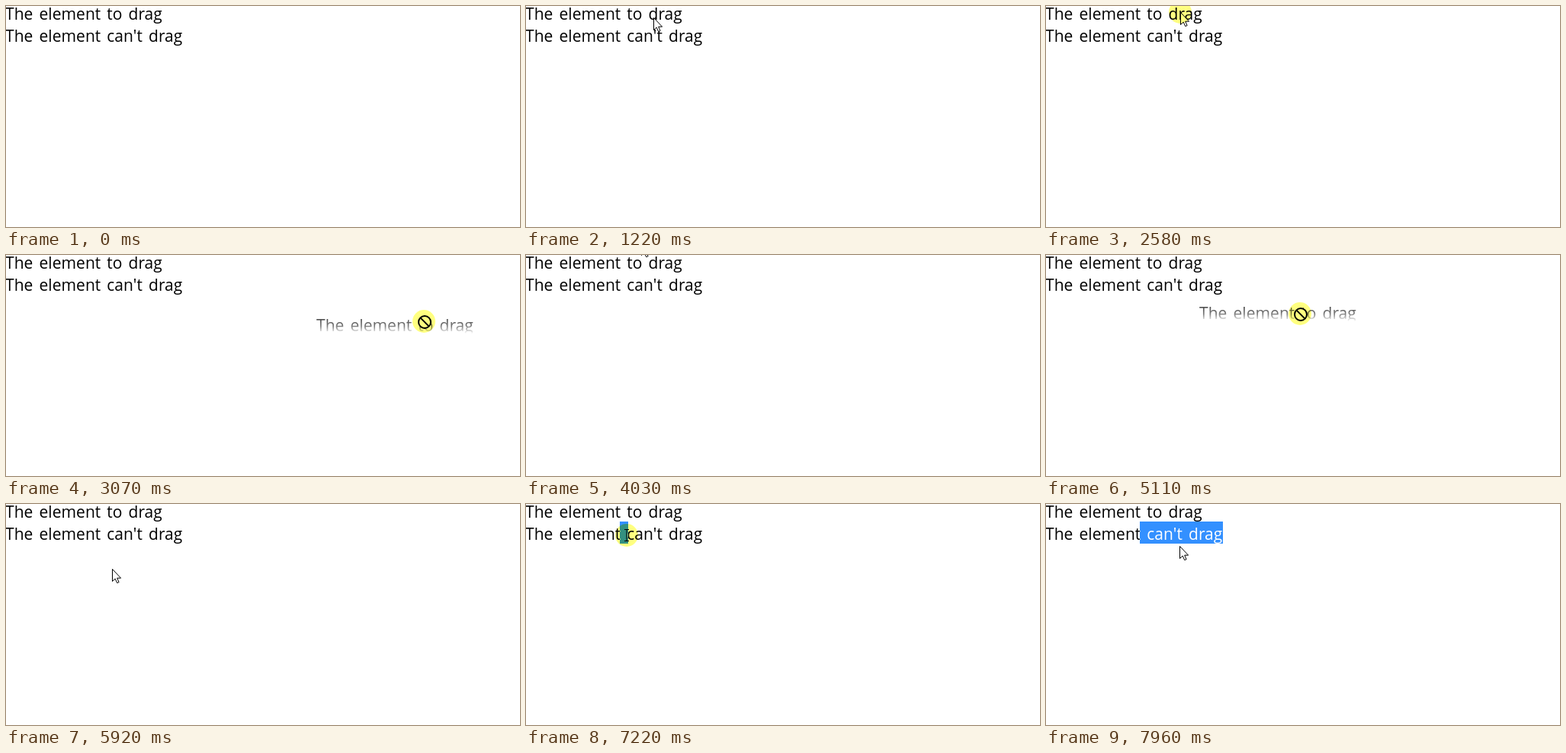
An HTML page that plays this animation: 674 px wide and 290 px high, repeating every 8000 ms.

```html
<!DOCTYPE html>
<html lang="en">
<head>
<meta charset="utf-8">
<title>Drag demo</title>
<style>
  html, body { margin: 0; width: 100%; height: 100%; overflow: hidden; background: #fff; }
  svg { display: block; }
  text { font: 21px "Open Sans", "Noto Sans", sans-serif; letter-spacing: .05px; word-spacing: 2.5px; white-space: pre; }
  #press { mix-blend-mode: multiply; }
</style>
</head>
<body>
<svg width="674" height="290" viewBox="0 0 674 290">
  <defs>
    <linearGradient id="fade" gradientUnits="userSpaceOnUse" x1="0" y1="-16" x2="0" y2="3">
      <stop offset="0" stop-opacity=".7"/>
      <stop offset=".5" stop-opacity=".5"/>
      <stop offset="1" stop-opacity="0"/>
    </linearGradient>
    <clipPath id="selected"><rect id="clip" x="123" y="23" width="0" height="29"/></clipPath>
  </defs>

  <text x="-1" y="18">The element to drag</text>
  <text x="-1" y="47">The element can't drag</text>
  <g clip-path="url(#selected)">
    <rect x="123" y="23" width="109" height="29" fill="#3390ff"/>
    <text x="-1" y="47" fill="#fff">The element can't drag</text>
  </g>

  <text id="ghost" fill="url(#fade)">The element to drag</text>

  <path id="arrow" d="M.5 .5V16.5L4.2 13.1 6.7 18.6 9.1 17.6 6.7 12.2H11.6Z" fill="#fff" stroke="#000"/>
  <path id="beam" d="M-3 -7.5H3M-3 7.5H3M0 -7V7" fill="none" stroke="#000"/>
  <g id="deny" fill="#fff" stroke="#000" stroke-width="2">
    <circle cx="1" cy="1" r="8"/>
    <path d="M-4.6 -4.6L6.6 6.6"/>
  </g>
  <circle id="press" r="15" fill="#ffff80"/>
</svg>
<script>
const LOOP = 8000;
const SEL_LEFT = 123, SEL_RIGHT = 232, CHAR = 11;
const $ = id => document.getElementById(id);

const linear = k => k;
const easeOut = k => 1 - (1 - k) ** 1.75;
const easeInOut = k => k * k * (3 - 2 * k);

// Pointer strokes: n held positions from time a to b along a quadratic curve.
const strokes = [];
function stroke(a, b, n, from, to, ease = linear, bend) {
  const mid = bend || from.map((v, i) => (v + to[i]) / 2);
  const at = t => {
    const k = Math.min(1, Math.floor((t - a) / (b - a) * (n - 1) + 1e-6) / (n - 1));
    const u = ease(k), v = 1 - u;
    return from.map((p, i) => Math.round(v * v * p + 2 * u * v * mid[i] + u * u * to[i]));
  };
  strokes.push({ a, at });
}
const hide = a => strokes.push({ a, at: () => [-60, -60] });

hide(0);
stroke(70, 820, 10, [589, 274], [165, 20], easeOut, [259, 131]);
stroke(890, 2100, 6, [166, 17], [169, 7]);
stroke(2580, 3210, 10, [176, 8], [573, 96], easeOut, [400, 30]);
stroke(3410, 3630, 4, [572, 96], [244, -12]);
hide(3700);
stroke(4030, 4430, 5, [151, -16], [151, 9]);
stroke(4830, 5380, 9, [172, 12], [525, 252], easeInOut, [318, 22]);
stroke(5710, 5920, 4, [518, 245], [139, 85]);
stroke(6050, 6670, 9, [135, 78], [124, 36]);
stroke(7020, 7660, 9, [122, 38], [249, 93], easeInOut, [150, 45]);
stroke(7750, 7960, 4, [228, 82], [175, 55]);

const drags = [
  { down: 2300, from: 2650, up: 3410, dx: -141, dy: 13 },
  { down: 4630, from: 4830, up: 5710, dx: -132, dy: 7 }
];
const select = { down: 7020, up: 7730 };

const pointer = t => strokes.findLast(s => s.a <= t).at(t);
const show = (id, on) => $(id).setAttribute("visibility", on ? "visible" : "hidden");
const place = (id, x, y) => $(id).setAttribute("transform", `translate(${x} ${y})`);

// Below the line everything is selected; on it, up to the nearest character.
function selectionWidth(t) {
  if (t < select.down) return 0;
  const [x, y] = pointer(Math.min(t, select.up));
  const end = y > 52 ? SEL_RIGHT : x;
  const width = Math.round((end - SEL_LEFT) / CHAR) * CHAR;
  return Math.max(0, Math.min(width, SEL_RIGHT - SEL_LEFT));
}

function draw(t) {
  const [x, y] = pointer(t);
  const drag = drags.find(d => t >= d.from && t < d.up);
  const pressed = [...drags, select].some(d => t >= d.down && t < d.up);
  const overText = !drag && y > 22 && y < 52 && x < SEL_RIGHT;

  for (const id of ["arrow", "beam", "deny", "press"]) place(id, x, y);
  show("deny", drag);
  show("beam", overText);
  show("arrow", !drag && !overText);
  show("press", pressed);
  show("ghost", drag);
  if (drag) place("ghost", x + drag.dx, y + drag.dy);
  $("clip").setAttribute("width", selectionWidth(t));
}

const start = performance.now();
function tick() {
  draw((performance.now() - start) % LOOP);
  requestAnimationFrame(tick);
}
tick();
</script>
</body>
</html>
```
